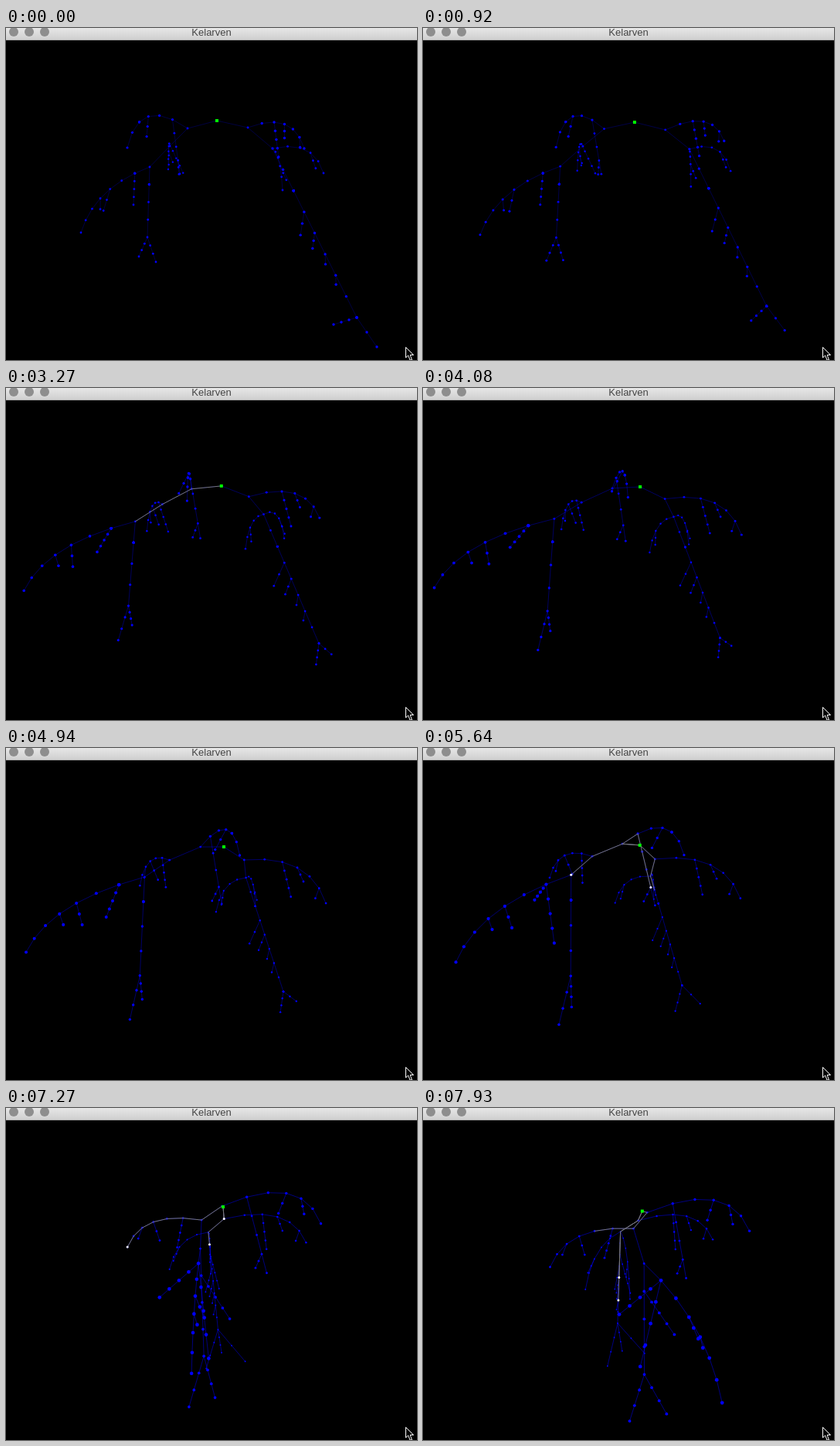
Animation, 532 px wide and 430 px high, one loop 7990 ms. Source, as an HTML page with a canvas:

```html
<!DOCTYPE html>
<html lang="en">
<head>
<meta charset="utf-8">
<title>Kelarven</title>
<style>
  html, body { margin: 0; width: 100%; height: 100%; overflow: hidden; background: #000; }
  canvas { position: absolute; left: 0; top: 0; }
  header {
    position: absolute; left: 0; top: 0; width: 532px; height: 15px;
    background: linear-gradient(#e6e6e6, #d0d0d0); border-bottom: 1px solid #aaa;
    font: 13px/13px "Liberation Sans", Arial, sans-serif; color: #444;
    text-align: center; overflow: hidden;
  }
  header span { position: relative; top: -1px; }
  header i {
    position: absolute; top: -1px; width: 12px; height: 12px;
    border-radius: 50%; background: #8e8e8e;
  }
  svg { position: absolute; left: 516px; top: 412px; }
</style>
</head>
<body>
<canvas width="532" height="430"></canvas>
<header>
  <i style="left:4px"></i><i style="left:24px"></i><i style="left:44px"></i>
  <span>Kelarven</span>
</header>
<svg width="16" height="18">
  <path d="M1.5 1.5V15L4.6 12L7 18H9.5L7.2 11.5H11.5Z" fill="#000" stroke="#fff"/>
</svg>
<script>
const LOOP = 7990, STEPS = 140;
const KEY_TIMES = [0, 1.85, 4.94, 6.62, 7.93];
const ctx = document.querySelector('canvas').getContext('2d');
const limbs = [];

const mix = (a, b, u) => a + (b - a) * u;
const clamp = v => Math.max(0, Math.min(1, v));

// Smooth curve through five values at KEY_TIMES.
function spline(values, t) {
  const T = KEY_TIMES, last = T.length - 1;
  const slope = i => (values[i + 1] - values[i]) / (T[i + 1] - T[i]);
  const tangent = i => {
    if (i === 0) return slope(0);
    if (i === last) return slope(last - 1);
    return mix(slope(i - 1), slope(i), (T[i] - T[i - 1]) / (T[i + 1] - T[i - 1]));
  };
  let i = 0;
  while (i < last - 1 && t > T[i + 1]) i++;
  const h = T[i + 1] - T[i], u = (t - T[i]) / h, v = 1 - u;
  return v * v * (1 + 2 * u) * values[i] + u * u * (3 - 2 * u) * values[i + 1]
    + h * u * v * (v * tangent(i) - u * tangent(i + 1));
}

function motion(...points) {
  const xs = points.map(p => p[0]), ys = points.map(p => p[1]);
  return t => [spline(xs, t), spline(ys, t)];
}

// A chain of dots from a parent's node to a moving tip, arched by lift.
function limb(parent, joint, steps, size, lift, tip) {
  const part = { parent, joint, steps, size, lift, tip, nodes: [] };
  limbs.push(part);
  return part;
}

// A short chain that hangs from a limb and turns with the whole tree.
function twig(parent, joint, steps, reach, phase, drop, born = -9) {
  return limb(parent, joint, steps, parent.size, 0, (t, [x, y]) => {
    const grown = clamp((t - born) / 1.5);
    return [x + grown * reach * Math.sin(phase + 0.3 * t), y + grown * drop];
  });
}

const root = {
  tip: motion([273, 120], [275, 124], [282, 128], [279, 124], [284, 134]), nodes: []
};
const MID = [2.8, 2.8], NEARING = [2.8, 4.8], LEAVING = [3.4, 1.8];

const left = limb(root, 0, 1, MID, 0,
  motion([235, 130], [235, 131], [252, 128], [270, 121], [291, 136]));
const right = limb(root, 0, 1, MID, 0,
  motion([313, 129], [314, 135], [308, 145], [287, 142], [278, 146]));
const shoulder = limb(left, 1, 1, MID, 0,
  motion([212, 153], [203, 153], [212, 145], [236, 137], [274, 157]));
const elbow = limb(shoulder, 1, 1, MID, 0,
  motion([186, 180], [171, 178], [180, 167], [221, 167], [289, 203]));
const hip = limb(right, 1, 1, LEAVING, 0,
  motion([345, 156], [343, 158], [310, 168], [270, 162], [255, 160]));

const wing = limb(elbow, 1, 7, NEARING, 8,
  motion([97, 265], [53, 270], [27, 265], [117, 310], [399, 385]));
const stem = limb(elbow, 1, 4, [2.8, 3.8], 0,
  motion([183, 271], [164, 273], [174, 295], [228, 302], [289, 347]));
limb(stem, 4, 3, [2.8, 3.8], 0,
  motion([172, 296], [150, 308], [161, 352], [209, 371], [270, 407]));
limb(stem, 4, 3, [2.8, 3.8], 0,
  motion([194, 303], [171, 300], [177, 326], [231, 356], [319, 398]));
limb(wing, 1, 4, NEARING, 0,
  motion([165, 229], [140, 228], [131, 220], [239, 309], [283, 336]));

const arch = limb(left, 1, 6, [3.2, 3.4], 28,
  motion([157, 155], [191, 153], [304, 139], [389, 142], [424, 160]));
const tassel = limb(arch, 1, 4, MID, 0,
  motion([225, 189], [238, 190], [280, 202], [331, 208], [341, 221]));
const fringe = limb(shoulder, 1, 6, [2.4, 2.8], 15,
  motion([210, 183], [190, 186], [173, 178], [153, 161], [165, 208]));

const trunk = limb(hip, 1, 8, LEAVING, 0,
  motion([454, 375], [433, 346], [358, 315], [297, 295], [250, 278]));
limb(trunk, 8, 2, LEAVING, 0,
  motion([480, 413], [454, 371], [375, 328], [331, 336], [285, 317]));
limb(trunk, 8, 3, LEAVING, 0,
  motion([424, 384], [422, 373], [354, 342], [281, 340], [237, 334]));
const crest = limb(right, 1, 6, [3.4, 2.4], 18,
  motion([386, 156], [394, 141], [414, 201], [400, 179], [374, 170]));
const outer = limb(hip, 1, 5, [2.8, 1.8], 14,
  motion([411, 188], [384, 184], [322, 205], [267, 190], [268, 250]));
const inner = limb(hip, 1, 5, [2.8, 2], 10,
  motion([358, 210], [334, 202], [271, 212], [217, 190], [210, 237]));

twig(trunk, 3, 2, 14, -2.8, 30);
twig(trunk, 4, 2, 8, -2.8, 20);
twig(trunk, 5, 1, 3, 3, 13);
twig(trunk, 6, 1, 3, 3, 12);
twig(trunk, 2, 4, 14, -1, 50, 6);
twig(trunk, 8, 3, 6, -1, 36, 6);
twig(wing, 3, 2, 12, -0.8, 28);
twig(wing, 4, 1, 5, 0, 14);
twig(wing, 1, 4, 56, -4.2, 44, 4.9);
twig(stem, 1, 4, 40, -1, 56, 5.6);
twig(arch, 3, 2, 14, 3.3, 26);
twig(arch, 4, 2, 5, -1, 24, 6);
twig(crest, 2, 4, 12, 0.5, 45);
twig(crest, 3, 2, 8, 0, 18);
twig(crest, 5, 1, 5, 3, 13);
twig(fringe, 1, 4, 18, 1.4, 38);
twig(fringe, 3, 2, 10, 0, 24);
twig(fringe, 4, 1, 6, 2, 14);
twig(outer, 3, 2, 8, 1, 20);
twig(inner, 3, 2, 9, 2, 18);
twig(tassel, 3, 2, 9, 3, 18);

// Signals run outwards from the root: limb, start time, lit head.
const pulses = [
  [stem, 2.79, false],
  [tassel, 4.95, true], [wing, 5.16, true], [trunk, 5.2, false],
  [crest, 6.14, false], [stem, 6.1, true], [fringe, 6.26, true],
  [trunk, 6.85, true], [trunk, 7.05, true], [fringe, 7.33, false]
];

function place(part, t) {
  const start = part.parent.nodes[part.joint];
  const end = part.tip(t, start);
  const bowX = part.lift ? 0.15 * (end[0] - start[0]) : 0;
  part.nodes = Array.from({ length: part.steps + 1 }, (_, i) => {
    const u = i / part.steps, bow = 4 * u * (1 - u);
    return [mix(start[0], end[0], u) + bow * bowX,
            mix(start[1], end[1], u) - bow * part.lift];
  });
}

function trail(part, count = part.steps) {
  if (!part.parent) return [part.nodes[0]];
  return [...trail(part.parent, part.joint), ...part.nodes.slice(1, count + 1)];
}

function line(points, color) {
  ctx.strokeStyle = color;
  ctx.beginPath();
  points.forEach(p => ctx.lineTo(...p));
  ctx.stroke();
}

function dot([x, y], size, color) {
  ctx.fillStyle = color;
  ctx.beginPath();
  ctx.arc(x, y, size / 2, 0, 2 * Math.PI);
  ctx.fill();
}

function drawPulse([part, start, lit], t) {
  const route = trail(part), head = Math.floor((t - start) / 0.12 + 0.01);
  if (head < 1 || head >= route.length) return;
  line(route.slice(0, head + 1), '#777');
  if (lit) dot(route[head], 3, '#fff');
}

function draw(t) {
  ctx.fillStyle = '#000';
  ctx.fillRect(0, 0, 532, 430);
  root.nodes = [root.tip(t)];
  limbs.forEach(part => place(part, t));

  const edge = `rgba(0, 0, 255, ${mix(0.25, 0.5, t / 8)})`;
  limbs.forEach(part => line(part.nodes, edge));
  limbs.forEach(part => part.nodes.slice(1).forEach(p =>
    dot(p, mix(...part.size, t / 8), '#00f')));
  pulses.forEach(pulse => drawPulse(pulse, t));

  const [x, y] = root.nodes[0];
  ctx.fillStyle = '#0f0';
  ctx.fillRect(x - 2, y - 2, 4, 4);
}

function tick() {
  const frame = LOOP / STEPS;
  draw(Math.floor((performance.now() % LOOP) / frame) * frame / 1000);
  requestAnimationFrame(tick);
}
tick();
</script>
</body>
</html>
```
